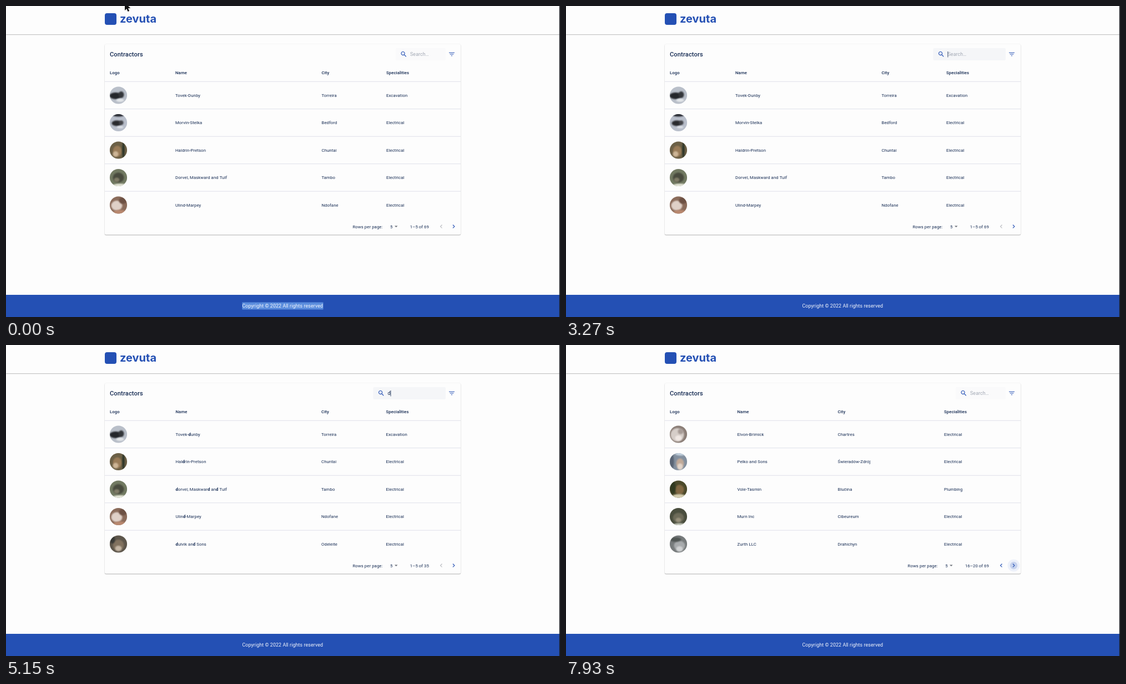
An HTML page with a canvas for the animation above (8000 ms loop, 998 by 561 pixels).

```html
<!DOCTYPE html>
<html lang="en">
<head>
<meta charset="utf-8">
<title>Contractors</title>
<style>
  html, body { margin: 0; width: 100%; height: 100%; overflow: hidden; background: #fdfdfd; }
  canvas { display: block; position: absolute; left: 0; top: 0; width: 998px; height: 561px; }
</style>
</head>
<body>
<canvas id="stage"></canvas>
<script>
const W = 998, H = 561, LOOP = 8000, UNIT = 0.556;
const BLUE = '#2450b4', INK = '#142a52', PAPER = '#fdfdfd';
const ROW = 49.5, CARD = { x: 178, y: 69, w: 641 };
const SMALL = 14 * UNIT, BODY = 16 * UNIT, TITLE = 20 * UNIT;

const canvas = document.getElementById('stage');
const ctx = canvas.getContext('2d');
const dpr = window.devicePixelRatio || 1;
canvas.width = Math.round(W * dpr);
canvas.height = Math.round(H * dpr);

const ICONS = {
  search: 'M15.5 14h-.79l-.28-.27C15.41 12.59 16 11.11 16 9.5 16 5.91 13.09 3 9.5 3S3 5.91 3 9.5 5.91 16 9.5 16c1.61 0 3.09-.59 4.23-1.57l.27.28v.79l5 4.99L20.49 19l-4.99-5zm-6 0C7.01 14 5 11.99 5 9.5S7.01 5 9.5 5 14 7.01 14 9.5 11.99 14 9.5 14z',
  filter: 'M10 18h4v-2h-4v2zM3 6v2h18V6H3zm3 7h12v-2H6v2z',
  prev: 'M15.41 16.59 10.83 12l4.58-4.59L14 6l-6 6 6 6z',
  next: 'M8.59 16.59 13.17 12 8.59 7.41 10 6l6 6-6 6z',
  drop: 'M7 10l5 5 5-5z'
};
for (const key in ICONS) ICONS[key] = new Path2D(ICONS[key]);
const ARROW = new Path2D('M0 0V14L3.3 11 5.5 16 8.2 15 6 10H10.2Z');

// Each row: name, city, speciality, backdrop colour, blobs [x, y, rx, ry, colour]
const ROWS = [
  ['Tovek-Dunby', 'Torreira', 'Excavation', '#b9bfc9',
    [-5, 1, 11, 6, '#24262b'], [5, -1, 5, 6, '#33363a'], [3, 9, 7, 3, '#e3e6e9']],
  ['Morvin-Stelka', 'Bedford', 'Electrical', '#b9bfcb',
    [0, -15, 12, 4, '#282a31'], [-3, 1, 9, 5, '#292a2e'], [5, 0, 4, 4, '#45464a'], [3, 8, 6, 2, '#dfe3e8']],
  ['Haldrin-Pretson', 'Chuntai', 'Electrical', '#6c6046',
    [-2, 2, 8, 10, '#9a7c58'], [-5, 7, 5, 5, '#cdb596'], [9, 0, 2, 16, '#263126']],
  ['Dorvel, Maskward and Tulf', 'Tambo', 'Electrical', '#727a62',
    [0, 0, 10, 9, '#494b3e'], [-3, 4, 5, 4, '#807c67'], [3, 15, 14, 4, '#e5e6d8']],
  ['Ulind-Marpey', 'Ndofane', 'Electrical', '#8b6c5b',
    [-3, 1, 10, 9, '#dfd0c7'], [8, -8, 7, 6, '#6d5144'], [3, 13, 12, 4, '#b9886f']],
  ['Dulvik and Sons', 'Odeleite', 'Electrical', '#5d564b',
    [0, 2, 10, 10, '#81725f'], [0, 8, 6, 5, '#c3b5a3'], [-11, -8, 5, 7, '#393a36']],
  ['Lanmerrow LLC', 'Arwād', 'Electrical', '#6e5b48',
    [-1, 0, 10, 11, '#8a6b4f'], [-2, 7, 6, 5, '#c4a88c'], [12, 0, 2, 15, '#394537']],
  ['Pruvik Group', 'Odense', 'Plumbing', '#8f9690', [0, 3, 9, 9, '#565850']],
  ['Wesk-Tolmar', 'Setúbal', 'Electrical', '#a89a86', [-2, 2, 9, 8, '#665a4a']],
  ['Quorin Inc', 'Olsztyn', 'Excavation', '#6b715f', [1, 4, 8, 9, '#b3a48d']],
  ['Brevik-Osmel', 'Viseu', 'Electrical', '#b0b4ba', [-1, 3, 9, 8, '#514d48']],
  ['Kelvo and Sons', 'Brno', 'Plumbing', '#79695a', [0, 2, 9, 9, '#c9b9a5']],
  ['Yarnik LLC', 'Évora', 'Electrical', '#555d4b', [2, 3, 9, 8, '#948168']],
  ['Sulmo-Trevik', 'Nantes', 'Electrical', '#9ea3a8', [0, 3, 8, 10, '#3f4145']],
  ['Fosk Group', 'Tarnów', 'Electrical', '#8a7b69', [-2, 3, 9, 8, '#dad0c2']],
  ['Elvon-Brimick', 'Chartres', 'Electrical', '#8b7e77',
    [-2, 1, 12, 12, '#d6cec9'], [4, -5, 5, 5, '#a69b96'], [0, 7, 6, 5, '#f0e8e4']],
  ['Pelko and Sons', 'Świeradów-Zdrój', 'Electrical', '#83909f',
    [3, 3, 7, 9, '#c1aa99'], [3, 9, 5, 6, '#e2d5ca'], [-12, 0, 4, 14, '#596474'], [4, -14, 10, 3, '#c3d1de']],
  ['Vole-Tasmin', 'Blučina', 'Plumbing', '#4c4a2b',
    [2, 1, 8, 9, '#816843'], [-10, -3, 5, 12, '#313a20'], [1, 13, 12, 4, '#d4cdaf']],
  ['Murn Inc', 'Cibeureum', 'Electrical', '#4a4e3e',
    [0, 2, 10, 9, '#6d6b59'], [0, 6, 5, 4, '#98917c'], [2, 15, 12, 3, '#cdd0c2']],
  ['Zurth LLC', 'Drahichyn', 'Electrical', '#777b7c',
    [2, 3, 10, 9, '#a8abad'], [-5, -8, 10, 4, '#505654'], [2, 9, 6, 5, '#d0d2d3']]
].map(([name, city, job, tone, ...blobs]) => ({ name, city, job, tone, blobs }));

const COLUMNS = {
  first: [305, 568.5, 685], d: [305.5, 568, 684.5], lan: [331, 534, 653.5], later: [308.5, 489.5, 681]
};

// [start, value] steps; the last one reached applies
const TYPED = [[0, ''], [3380, 'l'], [3590, 'la'], [3800, 'lan'], [4400, 'la'], [4500, 'l'], [4600, ''], [4930, 'd'], [6100, '']];
const QUERY = [[0, ''], [3870, 'lan'], [4680, ''], [5080, 'd'], [6200, '']];
const PAGE = [[0, 0], [7340, 1], [7580, 2], [7840, 3]];
const FOCUS = 1830, BLUR = 7260, CLICKS = [7260, 7500, 7760];
const stepAt = (steps, t) => steps.filter(s => s[0] <= t).pop();
const clamp = v => Math.max(0, Math.min(1, v));
const ease = v => { v = clamp(v); return v * v * (3 - 2 * v); };

function text(str, x, y, size = SMALL, color = INK, weight = 400, family = 'Roboto') {
  ctx.font = `${weight} ${size}px ${family}, sans-serif`;
  ctx.letterSpacing = family === 'Roboto' ? size * 0.01 + 'px' : '0px';
  ctx.fillStyle = color;
  ctx.fillText(str, x, y);
  return ctx.measureText(str).width;
}

function icon(name, x, y, color) {
  ctx.save();
  ctx.translate(x, y);
  ctx.scale(UNIT, UNIT);
  ctx.translate(-12, -12);
  ctx.fillStyle = color;
  ctx.fill(ICONS[name]);
  ctx.restore();
}

function box(x, y, w, h, r, color) {
  ctx.fillStyle = color;
  ctx.beginPath();
  ctx.roundRect(x, y, w, h, r);
  ctx.fill();
}

function ellipse(x, y, rx, ry, color) {
  ctx.fillStyle = color;
  ctx.beginPath();
  ctx.ellipse(x, y, rx, ry, 0, 0, Math.PI * 2);
  ctx.fill();
}

function shadowed(color, dy, blur, draw) {
  ctx.save();
  ctx.shadowColor = color;
  ctx.shadowOffsetY = dy * dpr;
  ctx.shadowBlur = blur * dpr;
  draw();
  ctx.restore();
}

function ring(x, y) {
  ctx.strokeStyle = '#ec7272';
  ctx.lineWidth = 1.2;
  ctx.beginPath();
  ctx.arc(x, y, 9.5, 0, Math.PI * 2);
  ctx.stroke();
}

function avatar(row, y) {
  ctx.save();
  ctx.translate(202.5, y);
  ctx.beginPath();
  ctx.arc(0, 0, 15.6, 0, Math.PI * 2);
  ctx.clip();
  ctx.fillStyle = row.tone;
  ctx.fillRect(-16, -16, 32, 32);
  ctx.filter = `blur(${0.8 * dpr}px)`;
  for (const blob of row.blobs) ellipse(...blob);
  ctx.restore();
}

// Matches appear as typed, in bold
function marked(name, query, x, y) {
  const parts = query ? name.split(new RegExp(`(${query})`, 'i')) : [name];
  parts.forEach((part, i) => {
    if (part) x += text(i % 2 ? query : part, x, y, SMALL, INK, i % 2 ? 700 : 400);
  });
}

function drawHeader() {
  shadowed('rgba(0,0,0,.5)', 0.8, 1.6, () => box(0, 0, W, 51, 0, PAPER));
  box(178, 13, 21, 21, 4, BLUE);
  text('zevuta', 205, 30, 20, BLUE, 700, 'Inter');
}

function drawFooter(t) {
  box(0, 521, W, 40, 0, BLUE);
  if (t < FOCUS) box(425.5, 534.5, 146, 13, 0, '#5b8ddd');
  text('Copyright © 2022 All rights reserved', 425.5, 544.2, BODY, '#f4f7fd');
}

function drawSearch(t) {
  const open = ease((t - FOCUS) / 200) - ease((t - BLUR) / 200);
  const left = 702 - 40.5 * open;
  const hover = t > 1700 && t < 6500;
  box(left, 76, 792 - left, 22, 2, hover ? '#f5f6f8' : '#fafafb');
  icon('search', left + 14.5, 87, BLUE);
  const [since, value] = stepAt(TYPED, t);
  const x = left + 26;
  const width = value
    ? text(value, x, 90.2, BODY)
    : (text('Search…', x, 90.2, BODY, '#a2a8b4'), 0);
  const last = Math.max(since, FOCUS);
  if (t >= FOCUS && t < BLUR && (t - last) % 1000 < 500) box(x + width, 82, 0.8, 10.5, 0, INK);
  icon('filter', 803, 87, BLUE);
}

function drawPager(y, range, page, more, t) {
  const base = y + 2.8;
  ctx.font = `400 ${SMALL}px Roboto, sans-serif`;
  ctx.letterSpacing = SMALL * 0.01 + 'px';
  const x = 762 - ctx.measureText(range).width;
  text('Rows per page:', x - 103.3, base);
  text('5', x - 35.7, base);
  icon('drop', x - 25, y, '#6d7179');
  text(range, x, base);
  if (t > 7150) ellipse(806.5, y, 11, 11, '#edf1fa');
  const click = CLICKS.filter(c => c <= t).pop();
  if (click) ellipse(806.5, y, 4 + 7 * ease((t - click) / 400), 4 + 7 * ease((t - click) / 400), '#c6d2ed');
  icon('prev', 784, y, page ? BLUE : '#b9bbc0');
  icon('next', 806.5, y, more ? BLUE : '#b9bbc0');
}

function drawCard(t) {
  const query = stepAt(QUERY, t)[1];
  const page = stepAt(PAGE, t)[1];
  const rows = ROWS.filter(r => r.name.toLowerCase().includes(query)).slice(page * 5, page * 5 + 5);
  const total = { '': 69, d: 35, lan: 1 }[query];
  const cols = COLUMNS[query || (page ? 'later' : 'first')];
  const bottom = 165 + ROW * rows.length;

  const body = () => box(CARD.x, CARD.y, CARD.w, bottom - CARD.y, 2.5, PAPER);
  shadowed('rgba(0,0,0,.22)', 0.4, 1.8, body);
  shadowed('rgba(0,0,0,.22)', 0.9, 1, body);

  text('Contractors', 187, 91, TITLE, INK, 500);
  drawSearch(t);
  ['Logo', 'Name', 'City', 'Specialities'].forEach((label, i) =>
    text(label, i ? cols[i - 1] : 187, 123, SMALL, INK, 500));

  rows.forEach((row, i) => {
    const y = 161 + ROW * i;
    box(CARD.x, y - 25.2, CARD.w, 0.9, 0, '#dfe0ea');
    avatar(row, y);
    marked(row.name, query, cols[0], y + 2.7);
    text(row.city, cols[1], y + 2.7);
    text(row.job, cols[2], y + 2.7);
  });

  const first = page * 5 + 1, last = page * 5 + rows.length;
  drawPager(bottom - 14.8, `${first}–${last} of ${total}`, page, last < total, t);
}

function drawPointer(t) {
  if (t < 160) {
    ctx.save();
    ctx.translate(214, -6 - 12 * clamp((t - 70) / 90));
    ctx.lineWidth = 1.6;
    ctx.strokeStyle = '#fff';
    ctx.stroke(ARROW);
    ctx.fillStyle = '#111';
    ctx.fill(ARROW);
    ctx.restore();
  }
  if (t >= FOCUS && t < 2180) ring(741, 94.5);
  if (CLICKS.some(c => t >= c && t < c + 110)) ring(806.5, 397.5);
}

function draw(t) {
  ctx.setTransform(dpr, 0, 0, dpr, 0, 0);
  box(0, 0, W, H, 0, PAPER);
  drawHeader();
  drawCard(t);
  drawFooter(t);
  box(996.8, 0, 1.2, H, 0, '#1b1d22');
  drawPointer(t);
}

const start = performance.now();
function tick() {
  draw((performance.now() - start) % LOOP);
  requestAnimationFrame(tick);
}
tick();
</script>
</body>
</html>
```
